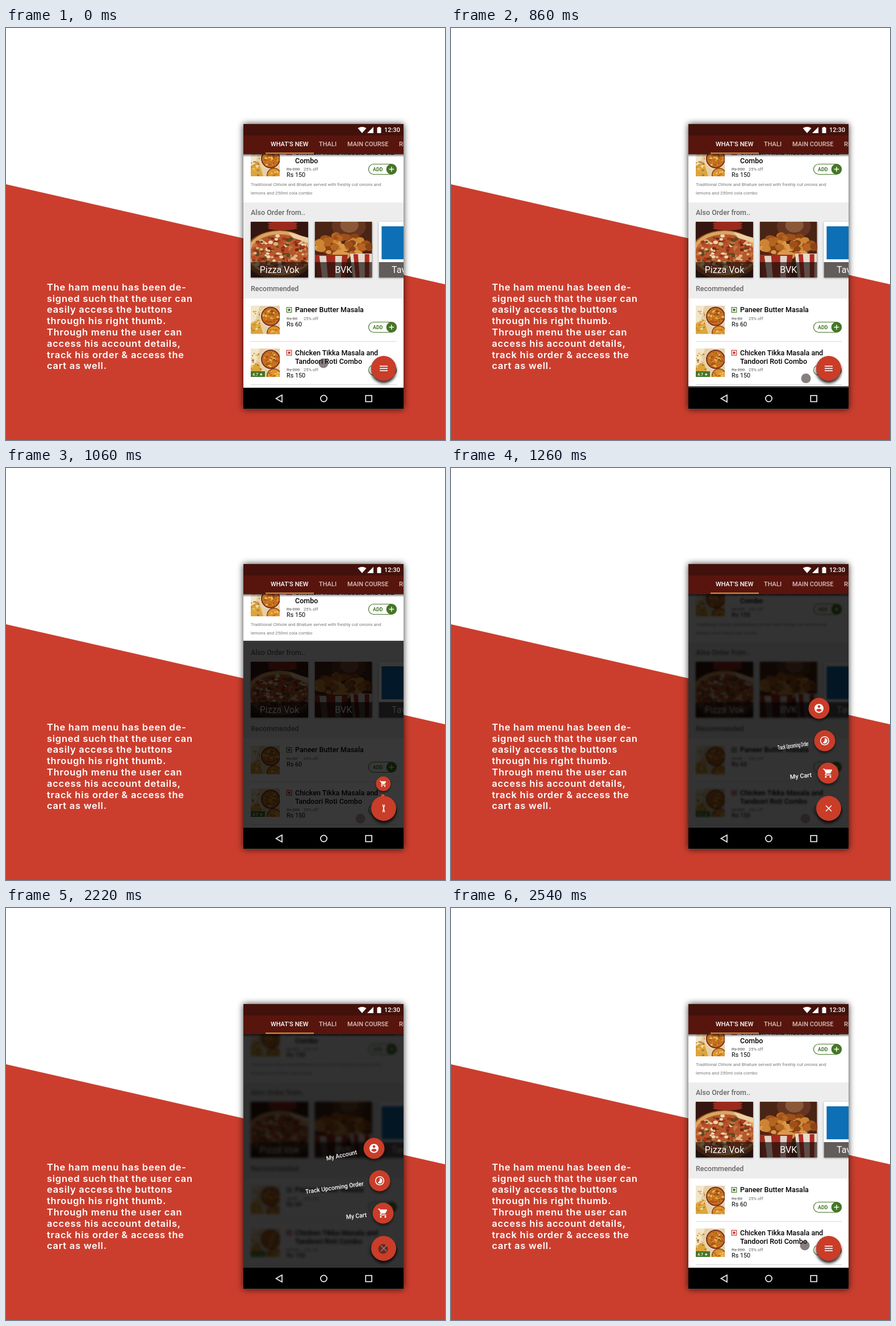
An HTML page that plays this animation: 773x725 px, repeating every 2900 ms.

```html
<!DOCTYPE html>
<html lang="en">
<head>
<meta charset="utf-8">
<title>Thumb menu</title>
<style>
  html, body { margin: 0; width: 100%; height: 100%; overflow: hidden; background: #fff; }
  svg { display: block; }
  text { font-family: Roboto, sans-serif; white-space: pre; }
  .medium { font-weight: 500; }
  .intro { font: 600 16.5px Inter, sans-serif; letter-spacing: .74px; fill: #fff; }
  .phone { filter: drop-shadow(0 0 6px rgba(0, 0, 0, .8)); }
  .card { filter: drop-shadow(0 1px 1.5px rgba(0, 0, 0, .45)); }
  .round { fill: #c93d29; filter: drop-shadow(0 3px 2.5px rgba(0, 0, 0, .6)); }
  #fab .round { filter: drop-shadow(0 4px 2.5px rgba(0, 0, 0, .85)); }
</style>
</head>
<body>
<svg id="stage" width="773" height="725" viewBox="0 0 773 725"></svg>
<script>
const LOOP = 2900, STEP = 40;
const GREEN = '#467528', RED = '#c5392a';
const FAB = { x: 665, y: 599 };

let seed = 7;
const random = () => (seed = seed * 16807 % 2147483647) / 2147483647;

const text = (x, y, size, str, attrs = '') =>
  `<text x="${x}" y="${y}" font-size="${size}" ${attrs}>${str}</text>`;
const rect = (x, y, w, h, fill, attrs = '') =>
  `<rect x="${x}" y="${y}" width="${w}" height="${h}" fill="${fill}" ${attrs}/>`;
const circle = (x, y, r, fill, attrs = '') =>
  `<circle cx="${x}" cy="${y}" r="${r}" fill="${fill}" ${attrs}/>`;
const ellipse = (x, y, rx, ry, fill) =>
  `<ellipse cx="${x}" cy="${y}" rx="${rx}" ry="${ry}" fill="${fill}"/>`;
const path = (d, fill, attrs = '') => `<path d="${d}" fill="${fill}" ${attrs}/>`;

// Random blobs scattered inside an ellipse
function blobs(count, cx, cy, rx, ry, size, colors) {
  let out = '';
  for (let i = 0; i < count; i++) {
    const a = random() * 2 * Math.PI, d = Math.sqrt(random()), s = size * (.6 + random() * .7);
    out += ellipse(cx + rx * d * Math.cos(a), cy + ry * d * Math.sin(a), s, s * .75, colors[i % colors.length]);
  }
  return out;
}

function thumb(y) {
  return `<svg x="431" y="${y}" width="51" height="50">` +
    rect(0, 0, 51, 50, '#e6cfa6') +
    path('M0 0H16L8 26L0 30Z', '#f2e6cc') +
    path('M0 32L14 24L22 50H0Z', '#dca53a') +
    blobs(24, 9, 28, 10, 22, 1.8, ['#c88a34', '#f1dfb4', '#e9bd55', '#a8743a']) +
    circle(35, 19, 19, '#e9d9c4') + circle(35, 19, 17, '#7b3216') + circle(35, 19, 15, '#c4701f') +
    blobs(36, 35, 19, 13, 13, 2, ['#dd9a35', '#b4531a', '#ecbd58', '#96501c']) +
    circle(41, 48, 13, '#8b3a16') + circle(41, 48, 11.5, '#dd962c') +
    blobs(8, 40, 45, 9, 6, 1.8, ['#c26a1c', '#f0c766']) + '</svg>';
}

const addButton = y =>
  rect(638.5, y - 9, 49, 18, '#fff', `rx="9" stroke="${GREEN}" stroke-width="1.2"`) +
  text(646, y + 3.1, 8.8, 'ADD', `fill="${GREEN}" font-weight="700"`) +
  circle(678.8, y, 9.2, GREEN) +
  path(`M674.5 ${y}h8.6m-4.3 -4.3v8.6`, 'none', 'stroke="#fff" stroke-width="1.4"');

function dish(top, titles, mark, oldPrice, price, addY) {
  const extra = titles.length > 1 ? 14.5 : 0;
  return thumb(top) +
    rect(494.2, top + 3.2, 8.6, 8.6, 'none', `stroke="${mark}" stroke-width="1.2"`) +
    circle(498.5, top + 7.5, 2.3, mark) +
    titles.map((s, i) => text(509, top + 11.5 + i * 15, 12.5, s, 'class="medium"')).join('') +
    text(494, top + 25 + extra, 7.6, oldPrice, 'fill="#777" text-decoration="line-through"') +
    text(524, top + 25 + extra, 7.6, '25% off', 'fill="#666"') +
    text(494, top + 36.7 + extra, 10.8, price) + addButton(addY);
}

const card = (x, label, art) =>
  rect(x, 341, 101, 98, '#fff', 'class="card" rx="1"') +
  `<svg x="${x}" y="341" width="101" height="98">${art}` + rect(0, 71, 101, 27, 'rgba(25,15,12,.68)') +
  text(50.5, 90, 16, label, 'fill="#fff" text-anchor="middle"') + '</svg>';

const pizza = rect(0, 0, 101, 98, '#35150f') +
  [3, 7, 11].map(y => ellipse(56, y, 26, 4, y % 2 ? '#9b2a1c' : '#5c1a12')).join('') +
  ellipse(50, 58, 62, 43, '#8e4a1c') + ellipse(51, 55, 58, 39, '#d9a461') + ellipse(51, 56, 52, 34, '#b5592c') +
  blobs(170, 51, 57, 52, 33, 3.4, ['#ddb583', '#a5361a', '#c4763f', '#7d2513', '#ecd6b4', '#5f4a20', '#b84a26']) +
  path('M66 18L101 28V37L74 28Z', '#ecd0a4');

const chicken = rect(0, 0, 101, 98, '#4a2414') + ellipse(60, 8, 30, 22, '#643520') + ellipse(61, 6, 16, 13, '#8a5836') +
  blobs(85, 50, 42, 47, 18, 7, ['#b5651f', '#8a4214', '#cd8434', '#9f501a', '#d9994c']) +
  path('M0 58H58L53 98H4Z', '#a52a1f') + path('M8 60H20L23 98H13ZM36 60H48L46 98H36Z', '#e2d3c6') +
  path('M62 56H101V98H67Z', '#e6dacd') + path('M68 57H76L79 98H72ZM88 57H96V98H88Z', '#b02b20');

const brand = rect(0, 0, 101, 98, '#fff') + rect(5, 8, 58, 58, '#0d6fb5');

const content = rect(418, 222, 282, 411, '#fff') +
  dish(211, ['Chicken Tikka Masala and Cola', 'Combo'], RED, 'Rs 200', 'Rs 150', 248.5) +
  text(431, 277.5, 7.92, 'Traditional Chhole and Bhature served with freshly cut onions and', 'fill="#777"') +
  text(431, 293.3, 7.92, 'lemons and 250ml cola combo', 'fill="#777"') +
  rect(418, 307, 282, 169, '#ededed') +
  text(431, 328.5, 12.5, 'Also Order from..', 'fill="#666" class="medium"') +
  card(431, 'Pizza Vok', pizza) + card(543.7, 'BVK', chicken) + card(656.4, 'Tavrello', brand) +
  text(431, 463.3, 12.5, 'Recommended', 'fill="#666" class="medium"') +
  dish(488.5, ['Paneer Butter Masala'], GREEN, 'Rs 80', 'Rs 60', 526.5) +
  rect(431, 551, 257, 1, '#d8d8d8') +
  dish(564, ['Chicken Tikka Masala and', 'Tandoori Roti Combo'], RED, 'Rs 200', 'Rs 150', 602) +
  rect(431, 604, 25, 10, GREEN) + text(434, 611.6, 7.2, '4.7 ★', 'fill="#fff" class="medium"') +
  rect(431, 627, 257, 1, '#d8d8d8');

const tabs = [[466, 'WHAT’S NEW', '#fff'], [551, 'THALI', '#d9c0bb'], [601, 'MAIN COURSE', '#d9c0bb'], [692, 'RICE', '#d9c0bb']];
const header = `<svg x="418" y="169" width="282" height="60" viewBox="418 169 282 60">` +
  rect(418, 222, 282, 5, 'url(#fade)') + rect(418, 169, 282, 20, '#43110b') + rect(418, 189, 282, 33, '#57150e') +
  path('M619.5 176.3Q627 171.5 634.5 176.3L627 185Z', '#fff') + path('M636 185H647V174Z', '#fff') +
  path('M653.5 175.3h2v-1.3h3v1.3h2V185h-7Z', '#fff') +
  text(666, 183.4, 11, '12:30', 'fill="#fff" class="medium"') +
  tabs.map(([x, s, fill]) => text(x, 208, 11, s, `fill="${fill}" class="medium"`)).join('') +
  rect(457, 219.3, 85, 2, '#e0963f') + '</svg>';

const navBar = rect(418, 633, 282, 37.5, '#000') +
  `<g fill="none" stroke="#fff" stroke-width="1.6"><path d="M475.5 652L486 645.8V658.2Z"/>` +
  `<circle cx="559.5" cy="652" r="5.6"/><rect x="633.3" y="646.7" width="10.8" height="10.8"/></g>`;

const disc = 'M12 2C6.48 2 2 6.48 2 12s4.48 10 10 10 10-4.48 10-10S17.52 2 12 2z';
const menu = [
  { x: 664, y: 537, label: 'My Cart', lx: 635.3, ly: 543.6, angle: -6, pop: 990, open: 1100,
    icon: 'M7 18c-1.1 0-2 .9-2 2s.9 2 2 2 2-.9 2-2-.9-2-2-2zM1 2v2h2l3.6 7.59-1.35 2.45C4.5 15.4 5.5 17 7 17h12v-2H7.42l-.22-.37.9-1.63h7.45c.75 0 1.41-.41 1.75-1.03l3.58-6.49L20 4H5.21l-.94-2H1zm16 16c-1.1 0-2 .9-2 2s.9 2 2 2 2-.9 2-2-.9-2-2-2z' },
  { x: 658, y: 480, label: 'Track Upcoming Order', lx: 630, ly: 488.5, angle: -8, pop: 1030, open: 1200,
    icon: disc + 'm0 18c-4.42 0-8-3.58-8-8s3.58-8 8-8 8 3.58 8 8-3.58 8-8 8zM12 6v6l-4.24 4.24A6 6 0 1 0 12 6z' },
  { x: 648, y: 423, label: 'My Account', lx: 618.5, ly: 433, angle: -12, pop: 1070, open: 1300,
    icon: disc + 'm0 3a3 3 0 1 1 0 6 3 3 0 1 1 0-6zm0 14.2c-2.5 0-4.71-1.28-6-3.22.03-1.99 4-3.08 6-3.08s5.97 1.09 6 3.08c-1.29 1.94-3.5 3.22-6 3.22z' }
];
const menuItem = m => `<g class="item"><circle r="18.5" class="round"/>` +
  path(m.icon, '#fff', 'fill-rule="evenodd" transform="scale(.8) translate(-12 -12)"') + '</g>' +
  text(0, 0, 10.9, m.label, 'class="medium label" fill="#fff" text-anchor="end"');

const intro = ['The ham menu has been de-', 'signed such that the user can', 'easily access the buttons', 'through his right thumb.',
  'Through menu the user can', 'access his account details,', 'track his order &amp; access the', 'cart as well.'];

const stage = document.getElementById('stage');
stage.innerHTML = `<linearGradient id="fade" x2="0" y2="1"><stop stop-opacity=".55"/><stop offset="1" stop-opacity="0"/></linearGradient>` +
  path('M0 275L773 451V725H0Z', '#cb3e2e') +
  intro.map((s, i) => `<text class="intro" x="72" y="${461.7 + i * 19.8}">${s}</text>`).join('') +
  rect(418, 169, 282, 501.5, '#fff', 'class="phone"') +
  `<svg x="418" y="222" width="282" height="411" viewBox="418 222 282 411"><g id="content">${content}</g>` +
  rect(418, 222, 282, 411, '#000', 'id="shade"') + '</svg>' + header + navBar + menu.map(menuItem).join('') +
  `<g id="fab" transform="translate(${FAB.x} ${FAB.y})"><circle r="22" class="round"/><g id="icon" stroke="#fff" stroke-width="1.6">` +
  '<path class="bar" d="M-7 0H7"/>'.repeat(3) + '</g></g>' + circle(0, 0, 8.5, 'rgba(35,22,22,.55)', 'id="touch"');

const [page, shade, icon, touch] = ['content', 'shade', 'icon', 'touch'].map(id => document.getElementById(id));
const [items, labels, bars] = ['.item', '.label', '.bar'].map(s => [...stage.querySelectorAll(s)]);
const move = (el, value) => el.setAttribute('transform', value);

const ramp = (t, a, b) => Math.min(1, Math.max(0, (t - a) / (b - a)));
const smooth = (t, a, b) => { const p = ramp(t, a, b); return p * p * (3 - 2 * p); };
const easeOut = (t, a, b) => 1 - (1 - ramp(t, a, b)) ** 3;
const shown = (t, inA, inB, outA, outB) => smooth(t, inA, inB) * (1 - smooth(t, outA, outB));
const mix = (a, b, p) => a + (b - a) * p;

function touchAt(t) {
  const [from, to, p] =
    t < 620 ? [[559, 590], [665, 602], smooth(t, 60, 460)] :
    t < 1640 ? [[665, 602], [624, 617], easeOut(t, 620, 960)] :
    t < 2200 ? [[624, 617], [664, 600], easeOut(t, 1640, 2180)] :
    [[664, 600], [623, 594], smooth(t, 2260, 2540)];
  return [mix(from[0], to[0], p), mix(from[1], to[1], p)];
}

// The three bars merge into one upright bar, which then opens into a cross
function drawIcon(t) {
  const phase = 2 * shown(t, 880, 1180, 2220, 2540);
  const turn = Math.min(1, phase), spread = Math.max(0, phase - 1);
  move(icon, `rotate(${90 * turn})`);
  icon.setAttribute('opacity', Math.min(1, .6 + Math.abs(1 - phase)));
  bars.forEach((bar, i) => {
    const side = i - 1;
    move(bar, `translate(0 ${side * 4 * (1 - turn ** 2)}) rotate(${side * 45 * spread})`);
    bar.setAttribute('opacity', side || !spread ? 1 : 0);
  });
}

function draw(t) {
  const blur = shown(t, 1100, 1380, 2180, 2300);
  page.style.filter = blur ? `blur(${3 * blur}px)` : 'none';
  shade.setAttribute('y', 633 - 411 * shown(t, 846, 1146, 2221, 2541));
  shade.setAttribute('opacity', mix(.78, .81, blur));
  menu.forEach((m, i) => {
    const out = 2440 - i * 30;
    const pop = shown(t, m.pop, m.pop + 110, out, out + 100);
    move(items[i], `translate(${mix(FAB.x, m.x, pop)} ${mix(FAB.y, m.y, pop)}) scale(${pop})`);
    items[i].style.display = pop ? '' : 'none';
    const width = shown(t, m.open, m.open + 120, 2200, 2340);
    move(labels[i], `translate(${m.lx} ${m.ly}) rotate(${m.angle}) scale(${width} 1)`);
    labels[i].style.display = width ? '' : 'none';
  });
  drawIcon(t);
  move(touch, `translate(${touchAt(t)})`);
}

const start = performance.now();
function tick() {
  const t = (performance.now() - start) % LOOP;
  draw(Math.min(2540, Math.floor((t - 20) / STEP) * STEP + 20));
  requestAnimationFrame(tick);
}
tick();
</script>
</body>
</html>
```
